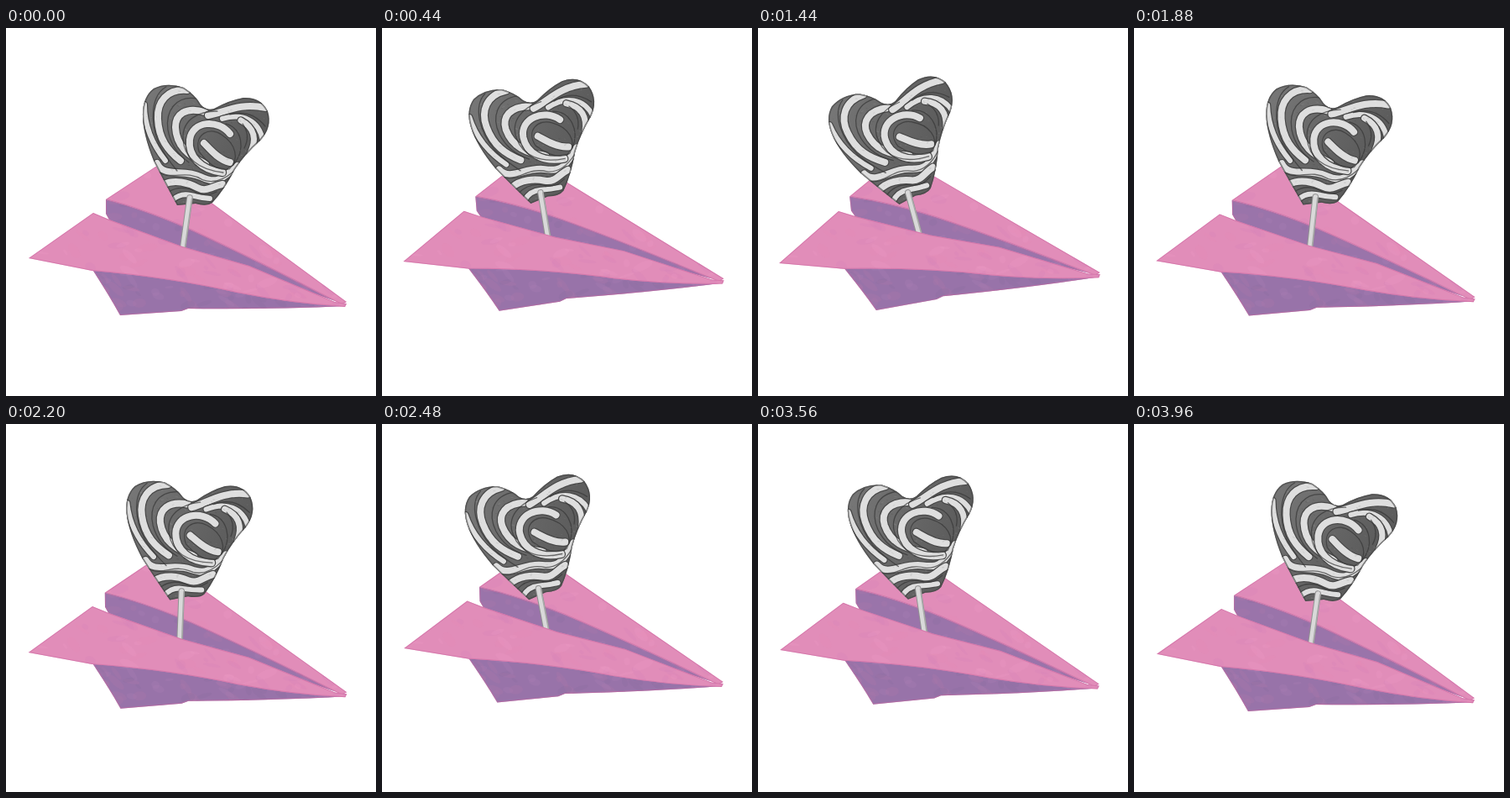
These frames come from a looping animation (441x438 px, 4000 ms). An HTML page with a canvas:

```html
<!DOCTYPE html>
<html lang="en">
<head>
<meta charset="utf-8">
<title>Paper plane and lollipop</title>
<style>
html, body { margin: 0; width: 100%; height: 100%; overflow: hidden; background: #fff; }
canvas { display: block; }
</style>
</head>
<body>
<canvas id="stage" width="441" height="438"></canvas>
<script>
const ctx = document.getElementById('stage').getContext('2d');
const LOOP = 4000;
const PLANE = { x: 216.5, y: 301, tilt: 8.1 };
const PIVOT = { x: 184, y: 297 };

// time, plane height, plane tilt in degrees, lollipop sway (1 = right, 0 = left)
const keys = [
  [0, 301, 8.1, 1], [240, 296, 6.2, .74], [480, 288, 2.9, .32], [800, 281, .6, 0],
  [1040, 280.6, .5, -.01], [1440, 286.5, 1.94, .17], [1680, 296, 4.5, .61], [1880, 299.7, 6.74, .94],
  [2000, 300.8, 7.5, 1], [2240, 295.6, 7.3, .74], [2480, 288, 6.29, .33], [2800, 283, 5.4, .08],
  [3120, 282.5, 5.23, .05], [3400, 285.8, 5.6, .19], [3680, 294, 7, .61], [3880, 299.6, 7.9, .94]
];

function keyAt(i) {
  const n = keys.length, k = keys[(i + n) % n];
  return [k[0] + Math.floor(i / n) * LOOP, ...k.slice(1)];
}

// Smooth periodic curve through the keys
function pose(t) {
  let i = keys.length - 1;
  while (keys[i][0] > t) i--;
  const [a, b, c, d] = [-1, 0, 1, 2].map(o => keyAt(i + o));
  const span = c[0] - b[0], u = (t - b[0]) / span;
  return [1, 2, 3].map(j => {
    const m = (c[j] - a[j]) / (c[0] - a[0]) * span;
    const n = (d[j] - b[j]) / (d[0] - b[0]) * span;
    return (2 * u ** 3 - 3 * u * u + 1) * b[j] + (u ** 3 - 2 * u * u + u) * m
      + (3 * u * u - 2 * u ** 3) * c[j] + (u ** 3 - u * u) * n;
  });
}

let seed = 7;
const random = () => (seed = seed * 16807 % 2147483647) / 2147483647;

function blots(count, x, y, w, h, colors) {
  return Array.from({ length: count }, (_, i) => ({
    x: x + random() * w, y: y + random() * h,
    rx: 3 + random() * 10, ry: 1.5 + random() * 4,
    turn: random() * 1.4 - .4, color: colors[i % colors.length]
  }));
}

const pinkTones = ['#ee9bc3', '#d381b4', '#e58bb0'];
const purpleTones = ['#ab7fb5', '#83689b', '#b078a9'];
const face = (d, fill, spots) => ({ path: new Path2D(d), fill, spots });

const backWing = face('M119 204L183 162L245 208L406 326L400 329L390 324Q300 277 220 240Q165 216 119 204Z',
  '#e18db9', blots(80, 119, 162, 287, 165, pinkTones));
const inside = face('M119 204Q165 216 220 240Q300 277 392 325L300 292L210 262L124 230L119 221Z',
  '#9a74aa', blots(70, 119, 204, 270, 120, purpleTones));
const keel = face('M102 286L185 293L404 331Q320 335 217 334L209 337L136 342Q121 315 102 286Z',
  '#9873a9', blots(90, 102, 287, 300, 55, purpleTones));
const frontWing = face('M27 274L104 220L123 228L210 260L290 283L392 326L406 328L404 332Q340 328 275 315Q195 297 103 289Z',
  '#e18db9', blots(110, 27, 220, 379, 110, pinkTones));

const heart = new Path2D(`M204 211Q186 178 176 158Q163 126 163 103Q163 82 176 72Q192 64 212 71
  Q226 80 232 91Q239 99 248 96Q266 86 283 83Q304 82 312 99Q318 118 303 134Q285 150 273 168
  Q260 193 246 208Q239 213 226 209Z`);

const stripe = (width, d) => ({ width, path: new Path2D(d) });
const whites = [
  stripe(8, 'M216 74C192 72 180 88 181 108C182 132 193 146 208 158'),
  stripe(6, 'M165 91C165 120 178 143 190 158'),
  stripe(8, 'M237 100C214 93 202 103 202 118C203 140 217 152 238 162'),
  stripe(8, 'M241 104C260 101 278 88 309 95'),
  stripe(6, 'M258 108C282 101 302 110 306 134'),
  stripe(7, 'M280 110C297 119 299 133 291 149'),
  stripe(8, 'M180 161C188 179 211 167 232 177S257 179 276 164'),
  stripe(8, 'M188 186C201 180 217 184 228 190S246 188 258 186'),
  stripe(6, 'M198 205Q208 196 220 199T243 203'),
  stripe(8, 'M258 172C232 169 217 152 219 133C222 110 253 108 267 126'),
  stripe(8, 'M236 137C242 143 253 157 267 160')
];
const creases = [
  'M191 70C173 80 171 111 182 137Q190 153 204 170',
  'M228 84C202 80 190 99 193 121Q197 145 218 160',
  'M252 99C229 99 210 109 211 132C212 154 229 169 259 172',
  'M262 114C282 120 286 145 271 163',
  'M230 147C224 126 243 117 257 127C274 138 279 156 266 168C251 171 238 158 230 147',
  'M267 103Q292 96 309 117',
  'M284 143Q292 128 282 114',
  'M184 172C202 181 213 168 235 181Q252 187 271 171',
  'M194 195Q211 185 229 197Q239 201 251 195'
].map(d => new Path2D(d));

const candy = ctx.createLinearGradient(165, 80, 310, 180);
candy.addColorStop(0, '#777');
candy.addColorStop(.5, '#656565');
candy.addColorStop(1, '#555');
const grain = blots(260, 163, 68, 152, 145, ['#fff', '#000']);

function strokePath(path, color, width) {
  ctx.strokeStyle = color;
  ctx.lineWidth = width;
  ctx.stroke(path);
}

function drawSpots(spots, alpha, scale = 1) {
  ctx.globalAlpha = alpha;
  for (const s of spots) {
    ctx.fillStyle = s.color;
    ctx.beginPath();
    ctx.ellipse(s.x, s.y, s.rx * scale, s.ry * scale, s.turn, 0, 7);
    ctx.fill();
  }
  ctx.globalAlpha = 1;
}

function drawFace({ path, fill, spots }) {
  ctx.save();
  ctx.fillStyle = fill;
  ctx.fill(path);
  ctx.clip(path);
  drawSpots(spots, .22);
  strokePath(path, 'rgba(205,105,160,.55)', 2);
  ctx.restore();
}

function turnAbout(x, y, degrees) {
  ctx.translate(x, y);
  ctx.rotate(degrees * Math.PI / 180);
  ctx.translate(-x, -y);
}

function onPlane(y, tilt, faces) {
  ctx.save();
  ctx.translate(0, y - PLANE.y);
  turnAbout(PLANE.x, PLANE.y, tilt - PLANE.tilt);
  faces.forEach(drawFace);
  ctx.restore();
}

const stick = new Path2D('M219 202L209 274');
const stickShade = new Path2D('M221.5 203L211.5 274');

function drawLollipop(sway) {
  ctx.save();
  turnAbout(PIVOT.x, PIVOT.y, -28 * (1 - sway));
  ctx.lineCap = 'round';
  ctx.fillStyle = candy;
  ctx.fill(heart);
  ctx.save();
  ctx.clip(heart);
  for (const { path, width } of whites) {
    strokePath(path, '#484848', width + 2.5);
    strokePath(path, '#dedede', width);
  }
  creases.forEach(path => strokePath(path, 'rgba(55,55,55,.7)', 1.3));
  drawSpots(grain, .08, .16);
  strokePath(heart, 'rgba(65,65,65,.6)', 3);
  ctx.restore();
  strokePath(stick, '#929292', 7.5);
  strokePath(stick, '#d9d9d9', 5.5);
  strokePath(stickShade, '#aaa', 1.5);
  ctx.restore();
}

function draw(now) {
  const [y, tilt, sway] = pose(now % LOOP);
  ctx.fillStyle = '#fff';
  ctx.fillRect(0, 0, 441, 438);
  onPlane(y, tilt, [backWing, inside]);
  drawLollipop(sway);
  onPlane(y, tilt, [keel, frontWing]);
  requestAnimationFrame(draw);
}
requestAnimationFrame(draw);
</script>
</body>
</html>
```
